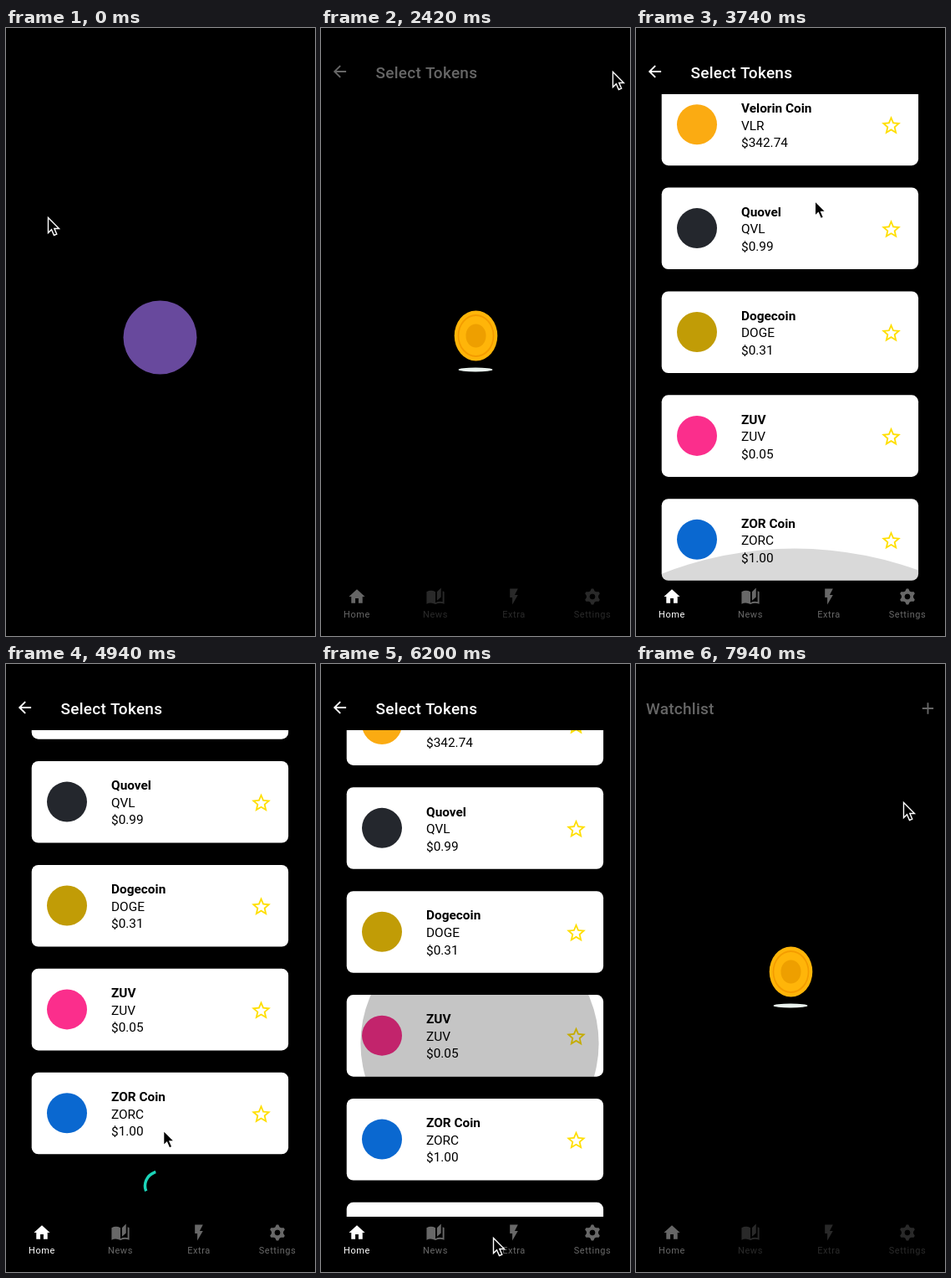
An HTML page with a canvas that plays this animation: 370x726 px, repeating every 8000 ms.

```html
<!DOCTYPE html>
<html lang="en">
<head>
<meta charset="utf-8">
<title>Coin list</title>
<style>
html, body { margin: 0; width: 100%; height: 100%; overflow: hidden; background: #000; }
canvas { display: block; }
</style>
</head>
<body>
<canvas id="stage" width="370" height="726"></canvas>
<script>
const ctx = document.getElementById('stage').getContext('2d');
const LOOP = 8000, TAU = Math.PI * 2;
const CARD_TOP = 90.4, CARD_STEP = 123.9, CARD_H = 97.6, LIST_END = 594;
const WATCHLIST_AT = 1040, SELECT_AT = 1820, LIST_AT = 2720, STAR_AT = 2960;
const SWIPE_FROM = 3380, MORE_AT = 5240, RETURN_AT = 6140, SWIPE_TO = 6200, BACK_AT = 7220;
const LOADS = [[WATCHLIST_AT, 1400], [1940, LIST_AT], [7460, LOOP]];

const coins = [
  ['Bitcoin', 'BTC', '$36,805.31', '#ff8600'],
  ['Ethereum', 'ETH', '$2,602.56', '#3d3d3f'],
  ['Morvex', 'MRVX', '$1.00', '#1ba384'],
  ['Cardano', 'ADA', '$1.66', '#1fc2c7'],
  ['Velorin Coin', 'VLR', '$342.74', '#fbab12'],
  ['Quovel', 'QVL', '$0.99', '#24272d'],
  ['Dogecoin', 'DOGE', '$0.31', '#c19c06'],
  ['ZUV', 'ZUV', '$0.05', '#fb2e8c'],
  ['ZOR Coin', 'ZORC', '$1.00', '#0a68d0'],
  ['Norvanta', 'NVT', '$21.40', '#7b61c9']
];

// Icons live on a 24 by 24 grid.
const icons = {
  back: new Path2D('M20 12H5.400M12.700 4.700L5.400 12l7.300 7.300'),
  plus: new Path2D('M5 12h14M12 5v14'),
  home: new Path2D('M10 20v-6h4v6h5v-8h3L12 3 2 12h3v8z'),
  news: new Path2D('M19 1l-5 5v11l5-4.5zM1 6v15Q6.5 18.600 12 21.5V6Q6.5 3 1 6zM23 6l-2-1v13.5q-4.5-1.200-9 1v2q5.5-2.800 11-.5z'),
  bolt: new Path2D('M7 2v11h3v9l7-12h-4l4-8z'),
  pointer: new Path2D('M0 0V18L4 14.200 7 21 10.300 19.600 7.400 13H13z'),
  gear: new Path2D(),
  star: new Path2D(),
  starOutline: new Path2D()
};
// Closed shape around the grid centre, its radius given for each corner.
function addPolar(path, count, radius, turn) {
  const corners = Array.from({ length: count }, (_, i) => {
    const a = (i + turn) / count * TAU, r = radius(i);
    return `${12 + r * Math.sin(a)} ${12 - r * Math.cos(a)}`;
  });
  path.addPath(new Path2D('M' + corners.join('L') + 'z'));
}
const addStar = (path, size) => addPolar(path, 10, i => i % 2 ? size * .455 : size, 0);
addStar(icons.star, 10.5);
addStar(icons.starOutline, 10.5);
addStar(icons.starOutline, 6.4);
addPolar(icons.gear, 24, i => i % 4 < 2 ? 10 : 7.4, -.5);
addPolar(icons.gear, 24, () => 3.5, 0);

const stops = [
  [0, 50, 226], [400, 50, 226], [580, 193, 243], [WATCHLIST_AT, 193, 243],
  [1760, 349, 42], [2420, 349, 52], [LIST_AT, 349, 52], [STAR_AT, 306, 140],
  [SWIPE_FROM, 225, 632], [SWIPE_TO, 206, 685], [6920, 143, 86],
  [7160, 20, 50], [7520, 356, 30], [7760, 320, 119], [7940, 320, 165], [LOOP, 320, 165]
];
const ripples = [
  { peak: 3740, card: 8, y: 497, r: 437, alpha: .15 },
  { peak: 6200, card: 7, y: 58, r: 142, alpha: .23 }
];

const clamp = k => Math.min(1, Math.max(0, k));
const smooth = k => k * k * (3 - 2 * k);

function pointerAt(t) {
  if (t >= SWIPE_FROM && t <= SWIPE_TO) {
    const a = (t - SWIPE_TO) / 687 * TAU;
    return [217 - 11 * Math.cos(a) - 27 * Math.sin(a), 430 + 255 * Math.cos(a)];
  }
  const i = stops.findIndex(stop => stop[0] > t);
  const [t0, x0, y0] = stops[i - 1], [t1, x1, y1] = stops[i];
  const k = smooth((t - t0) / (t1 - t0));
  return [x0 + (x1 - x0) * k, y0 + (y1 - y0) * k];
}

// A fling that slows towards the end of the list, then one back to the top.
function scrollAt(t) {
  const down = 1 - Math.exp(-Math.max(0, t - SWIPE_FROM) / 174);
  return LIST_END * down * (1 - smooth(clamp((t - RETURN_AT) / 438)));
}

function text(str, x, y, font, color, spacing = 0, align = 'left') {
  ctx.font = font + ' Roboto, sans-serif';
  ctx.letterSpacing = spacing + 'px';
  ctx.textAlign = align;
  ctx.fillStyle = color;
  ctx.fillText(str, x, y);
}

function icon(name, x, y, scale, color, outlined = false) {
  ctx.save();
  ctx.translate(x, y);
  ctx.scale(scale, scale);
  ctx.translate(-12, -12);
  ctx.fillStyle = ctx.strokeStyle = color;
  ctx.lineWidth = 2;
  if (outlined) ctx.stroke(icons[name]);
  else ctx.fill(icons[name], 'evenodd');
  ctx.restore();
}

function ellipse(x, y, rx, ry, color) {
  ctx.beginPath();
  ctx.ellipse(x, y, rx, ry, 0, 0, TAU);
  ctx.fillStyle = color;
  ctx.fill();
}

function drawCard(i, top, t) {
  const [name, code, price, color] = coins[i];
  ctx.save();
  ctx.beginPath();
  ctx.roundRect(30.7, top, 307.4, CARD_H, 8);
  ctx.fillStyle = '#fff';
  ctx.fill();
  ctx.clip();
  ellipse(73, top + 48.6, 24, 24, color);
  text(name, 126, top + 34.3, 'bold 15.4px', '#000');
  text(code, 126, top + 54.9, '15.4px', '#000');
  text(price, 126, top + 75.4, '15.4px', '#000');
  icon(i === 0 && t >= STAR_AT ? 'star' : 'starOutline', 305.5, top + 50.4, 1.14, '#ffdf00');
  for (const { peak, card, y, r, alpha } of ripples) {
    const dt = t - peak, fade = clamp(1 - Math.abs(dt) / 180);
    if (card === i && fade) {
      const radius = r + dt * .6;
      ellipse(190, top + y, radius, radius, `rgba(0,0,0,${alpha * fade})`);
    }
  }
  ctx.restore();
}

function drawList(t) {
  const scroll = scrollAt(t), more = t >= MORE_AT;
  ctx.save();
  ctx.beginPath();
  ctx.rect(0, 79, 370, 581);
  ctx.clip();
  for (let i = 0; i < coins.length - !more; i++) {
    drawCard(i, CARD_TOP + i * CARD_STEP - scroll, t);
  }
  if (!more) {
    const a = (158 + (t - 4940) * .36) / 360 * TAU;
    ctx.beginPath();
    ctx.arc(183.5, 623 + LIST_END - scroll, 17, a, a + 1.7);
    ctx.strokeStyle = '#1cd5b9';
    ctx.lineWidth = 3.5;
    ctx.stroke();
  }
  ctx.restore();
}

function drawHeader(selecting) {
  if (selecting) icon('back', 22.5, 52, .95, '#fff', true);
  else icon('plus', 349.5, 53, .95, '#fff', true);
  text(selecting ? 'Select Tokens' : 'Watchlist', selecting ? 65.5 : 12, 60.2, '500 19px', '#fff', .25);
}

function drawNav() {
  [['home', 'Home'], ['news', 'News'], ['bolt', 'Extra'], ['gear', 'Settings']].forEach(([name, label], i) => {
    const x = 43 + i * 94, color = i ? '#686868' : '#fff';
    icon(name, x, 679, .96, color);
    text(label, x, 704, '11px', color, .55, 'center');
  });
}

function drawLoader(age) {
  ctx.fillStyle = `rgba(0,0,0,${.6 * clamp(age / 120)})`;
  ctx.fillRect(0, 0, 370, 726);
  const turn = Math.abs(Math.cos(Math.PI * age / 411));
  const disc = (r, color) => ellipse(185.5, 367.5, r * turn, r, color);
  disc(30, '#ffb509');
  disc(25.5, '#f49c00');
  disc(23.5, '#ffb509');
  disc(14, '#ee9f00');
  ellipse(185, 408, 20.5, 2.4, '#e9f2ee');
}

function drawPointer(t) {
  const [x, y] = pointerAt(t);
  ctx.save();
  ctx.translate(x + .5, y + .5);
  ctx.fillStyle = '#000';
  ctx.strokeStyle = '#fff';
  ctx.lineWidth = 1.4;
  ctx.fill(icons.pointer);
  ctx.stroke(icons.pointer);
  ctx.restore();
}

function draw(t) {
  ctx.fillStyle = '#000';
  ctx.fillRect(0, 0, 370, 726);
  if (t < WATCHLIST_AT) {
    ellipse(184.5, 369.5, 44, 44, '#68499d');
  } else {
    const selecting = t >= SELECT_AT && t < BACK_AT;
    drawHeader(selecting);
    if (selecting && t >= LIST_AT) drawList(t);
    drawNav();
    const load = LOADS.find(([from, to]) => t >= from && t < to);
    if (load) drawLoader(t - load[0]);
  }
  drawPointer(t);
}

const start = performance.now();
function tick() {
  draw((performance.now() - start) % LOOP);
  requestAnimationFrame(tick);
}
tick();
</script>
</body>
</html>
```
